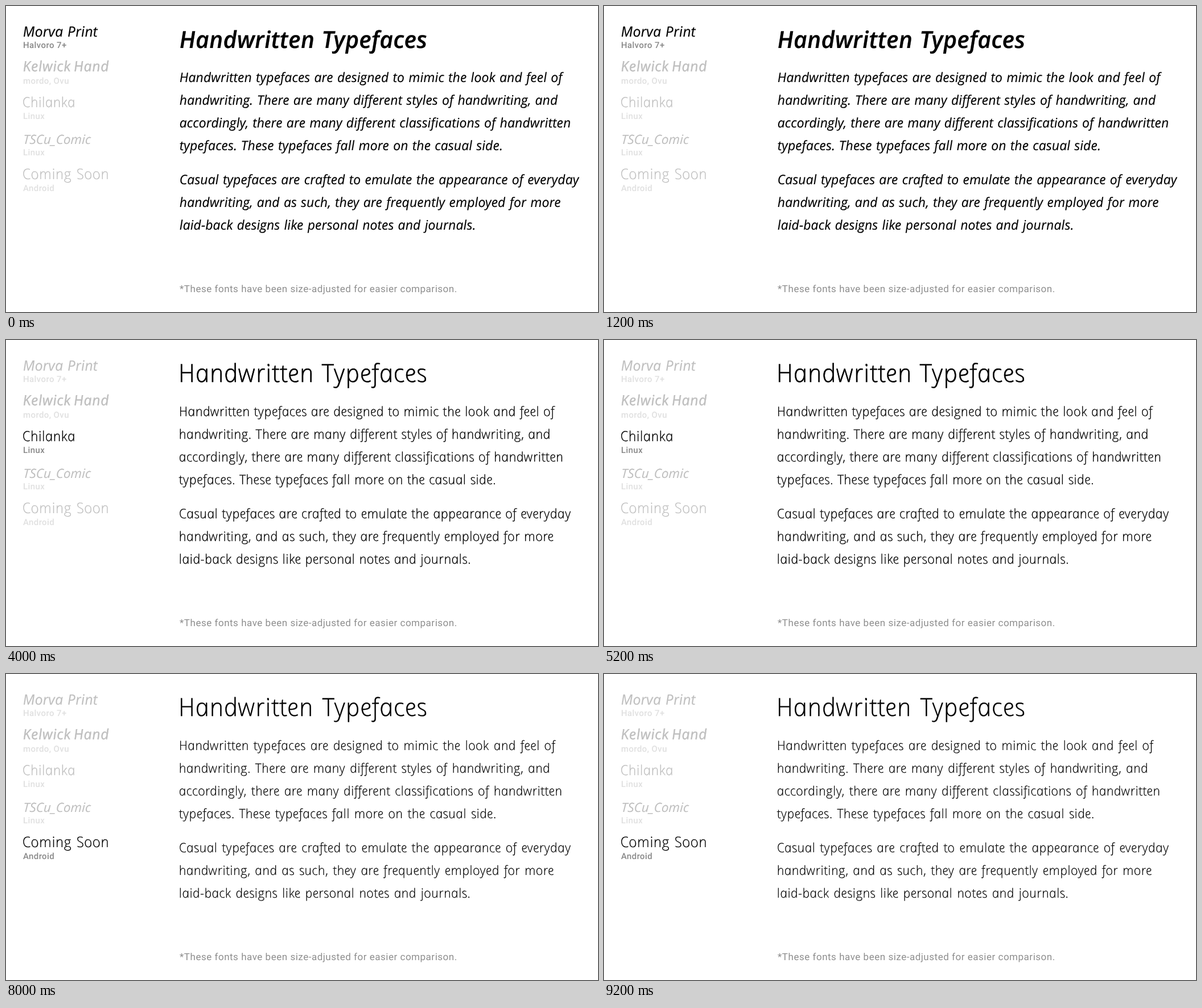
Animation of 1040x539 px, one loop 10 s. Source, as an HTML page:

```html
<!DOCTYPE html>
<html lang="en">
<head>
<meta charset="utf-8">
<title>Handwritten Typefaces</title>
<style>
  html, body { margin: 0; width: 100%; height: 100%; overflow: hidden; background: #fff; }
  svg { display: block; width: 100%; height: 100%; }
  text { text-rendering: geometricPrecision; white-space: pre; }
  .hand {
    font-family: "Open Sans", "Noto Sans", sans-serif;
    font-style: italic;
    font-variant-ligatures: none;
    fill: currentColor;
    stroke: currentColor;
    stroke-linejoin: round;
  }
  .note { font: 400 17px Roboto, sans-serif; letter-spacing: .52px; fill: #8e8e8e; }
  .name { color: #bfbfbf; }
  .system { font: 500 15px Roboto, sans-serif; letter-spacing: .4px; fill: #e0e0e0; }
  .on .name { color: #000; }
  .on .system { fill: #888; }
  .sample { color: #000; visibility: hidden; }
  .sample.on { visibility: visible; }
</style>
</head>
<body>
<svg id="stage" viewBox="0 0 1040 539"></svg>
<script>
const HOLD = 2000;
const LEFT = 30;
const COLUMN = 305;

const TITLE = "Handwritten Typefaces";
const PARAGRAPHS = [
  ["Handwritten typefaces are designed to mimic the look and feel of",
   "handwriting. There are many different styles of handwriting, and",
   "accordingly, there are many different classifications of handwritten",
   "typefaces. These typefaces fall more on the casual side."],
  ["Casual typefaces are crafted to emulate the appearance of everyday",
   "handwriting, and as such, they are frequently employed for more",
   "laid-back designs like personal notes and journals."]
];

// Sizes are in pixels, spacing and pen in em; lean is the skew in degrees.
const FACES = [
  { name: "Morva Print", system: "Halvoro 7+", y: 54, label: 25, body: 23.2, title: 41.5,
    weight: 400, titleWeight: 600, lean: 3, track: 0, gap: .05, pen: .006 },
  { name: "Kelwick Hand", system: "mordo, Ovu", y: 115, label: 25, body: 23, title: 42.5,
    weight: 400, titleWeight: 400, lean: 4, track: .024, gap: -.087, pen: .018 },
  { name: "Chilanka", system: "Linux", y: 178, label: 24.2, body: 23, title: 44,
    weight: 300, titleWeight: 300, lean: 12, track: .018, gap: .03, pen: .012 },
  { name: "TSCu_Comic", system: "Linux", y: 243, label: 22.5, body: 21.5, title: 42.8,
    weight: 400, titleWeight: 400, lean: -2, track: 0, gap: .265, pen: .004 },
  { name: "Coming Soon", system: "Android", y: 305, label: 25.6, body: 22.7, title: 43.8,
    weight: 300, titleWeight: 300, lean: 12, track: .018, gap: .075, pen: .008 }
];
const SYSTEM_Y = [74, 137, 199, 263, 326];

const stage = document.getElementById("stage");

function add(parent, tag, className) {
  const node = document.createElementNS("http://www.w3.org/2000/svg", tag);
  node.setAttribute("class", className);
  parent.appendChild(node);
  return node;
}

function print(parent, className, string, x, y, lean = 0) {
  const node = add(parent, "text", className);
  node.setAttribute("transform", `translate(${x} ${y}) skewX(${lean})`);
  node.textContent = string;
  return node;
}

function write(parent, className, string, x, y, face, size, weight) {
  const node = print(parent, "hand " + className, string, x, y, face.lean);
  Object.assign(node.style, {
    fontSize: size + "px",
    fontWeight: weight,
    letterSpacing: face.track + "em",
    wordSpacing: face.gap + "em",
    strokeWidth: face.pen * size + "px"
  });
}

function buildLabel(face, i) {
  const group = add(stage, "g", "label");
  write(group, "name", face.name, LEFT, face.y, face, face.label, face.weight);
  print(group, "system", face.system, LEFT, SYSTEM_Y[i]);
  return group;
}

function buildSample(face) {
  const group = add(stage, "g", "sample");
  write(group, "title", TITLE, COLUMN, 74, face, face.title, face.titleWeight);
  let y = 134;
  for (const lines of PARAGRAPHS) {
    for (const line of lines) {
      write(group, "line", line, COLUMN, y, face, face.body, face.weight);
      y += 40;
    }
    y += 20;
  }
  return group;
}

const labels = FACES.map(buildLabel);
const samples = FACES.map(buildSample);
print(stage, "note", "*These fonts have been size-adjusted for easier comparison.", COLUMN, 504);

const start = performance.now();

function draw() {
  const time = Math.max(0, performance.now() - start);
  const current = Math.floor(time / HOLD) % FACES.length;
  FACES.forEach((face, i) => {
    labels[i].classList.toggle("on", i === current);
    samples[i].classList.toggle("on", i === current);
  });
  requestAnimationFrame(draw);
}
draw();
</script>
</body>
</html>
```
